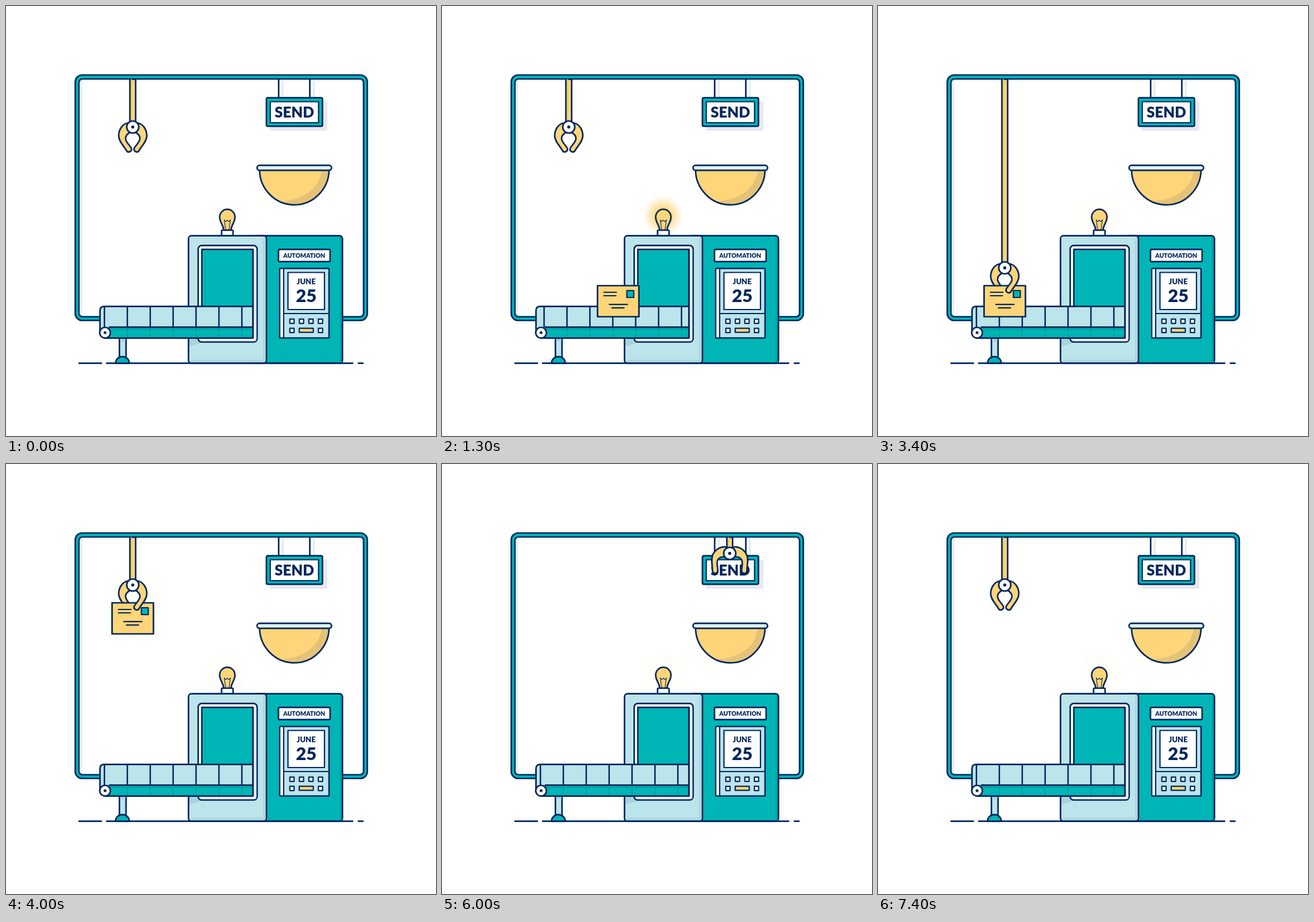
Animation, 748 px wide and 748 px high, one loop 8 s. Source, as an HTML page:

```html
<!DOCTYPE html>
<html lang="en">
<head>
<meta charset="utf-8">
<title>Mail automation</title>
<style>
  html, body { margin: 0; width: 100%; height: 100%; overflow: hidden; background: #fff; }
  svg { display: block; width: 100%; height: 100%; }
  .ln { stroke: #00265e; stroke-width: 2.7; stroke-linejoin: round; stroke-linecap: round; }
  .thin { stroke-width: 2.2; }
  .teal { fill: #00b5b5; }
  .sky { fill: #bce4eb; }
  .sun { fill: #fed578; }
  .white { fill: #fff; }
  .none { fill: none; }
  .gray { fill: #e6e9f0; }
  .skyShade { fill: #a6d2db; }
  .tealShade { fill: #00a3a7; }
  .sunShade { fill: #e4c278; }
  .navy { fill: #00265e; }
  text { font-family: Lato, "Open Sans", sans-serif; font-weight: 900; fill: #00265e; text-anchor: middle; }
</style>
</head>
<body>
<svg viewBox="0 0 748 748" xmlns="http://www.w3.org/2000/svg">
  <defs>
    <radialGradient id="halo">
      <stop offset="0" stop-color="#fdca58" stop-opacity=".95"/>
      <stop offset=".4" stop-color="#fdd066" stop-opacity=".75"/>
      <stop offset=".75" stop-color="#fed985" stop-opacity=".28"/>
      <stop offset="1" stop-color="#fee6ad" stop-opacity="0"/>
    </radialGradient>
    <clipPath id="beltClip"><path d="M164 530q0-7 7-7H429V577H164Z"/></clipPath>
    <clipPath id="mailClip"><path d="M0 0H748V281H429V748H0Z"/></clipPath>
    <path id="arm" d="M-8-7C-18-6-24.5 5-24.5 15C-24.5 25-16 32-11 41C-8.500 45.500-.8 43-2.500 37C-5 32-12.500 26-12.500 20C-12.500 14-8 11-4 9Z"/>
  </defs>

  <!-- wall frame -->
  <rect class="ln teal" x="120.500" y="120" width="508" height="427" rx="12"/>
  <rect class="ln white" x="127" y="127" width="495" height="413.500" rx="6"/>
  <path class="gray" d="M128.400 535V133q0-4.600 4.600-4.600H616q3 0 4 2H136q-4 0-4 4V538q-3.600 0-3.600-3Z"/>

  <!-- hanging sign -->
  <path class="gray" d="M480 128.500h3V166h-3ZM534 128.500h3V166h-3Z"/>
  <rect class="gray" x="459" y="166" width="100" height="51" rx="3"/>
  <path class="ln none" d="M474.300 128V159M528.500 128V159"/>
  <rect class="ln teal" x="453" y="159.700" width="97.500" height="49.500" rx="2.500"/>
  <rect class="ln thin white" x="459.700" y="166.500" width="84" height="36.500"/>
  <text x="501.500" y="194" font-size="25.800">SEND</text>

  <!-- lamp -->
  <circle id="glow" cx="384.500" cy="365" r="37" fill="url(#halo)"/>
  <circle id="rest" cx="384.500" cy="365" r="36.500" fill="#fed578"/>
  <path class="ln sun" d="M378.500 390C378.500 381 371.700 377 371.700 367A13.300 13.300 0 0 1 398.300 367C398.300 377 391.500 381 391.500 390Z"/>
  <path class="none" stroke="#00265e" stroke-width="1.100" d="M382 389L379.800 372.500L382.500 375L385 372.500L387.500 375L390.200 372.500L388 389"/>
  <rect class="ln white" x="375" y="390" width="20" height="10" rx="1.500"/>

  <!-- ground and machine -->
  <path class="ln none" d="M127 621.300H166M175 621.300H603M613 621.300H621"/>
  <rect class="ln teal" x="430" y="399.700" width="155.300" height="221.500" rx="5"/>
  <path class="tealShade" d="M580 402H582q2 0 2 3V619.800H580Z"/>
  <rect class="ln sky" x="317.500" y="399.700" width="135.500" height="221.500" rx="5"/>
  <path class="skyShade" opacity=".6" d="M447 404H451.600V616q0 3.800-4 3.800H322V615H447Z"/>
  <path class="skyShade" d="M319 578H340V586L319 592Z"/>
  <rect class="ln white" x="334.300" y="416.700" width="102.500" height="167.800" rx="6"/>
  <path class="gray" d="M431 424H435.400V580q0 3-3 3H340q-3 0-4-3H431Z"/>
  <rect class="ln teal" x="340.700" y="423.300" width="89" height="154"/>

  <!-- control panel -->
  <rect class="ln white" x="474" y="423.300" width="89.800" height="21.400" rx="2"/>
  <text x="518.700" y="438" font-size="10.500">AUTOMATION</text>
  <rect class="ln sky" x="476.200" y="456.500" width="85.800" height="121" rx="2"/>
  <rect class="white" x="477.500" y="457.800" width="5" height="118.400"/>
  <path class="ln thin none" d="M483 457V577M483 535H561.500"/>
  <rect class="ln thin white" x="490.500" y="463.500" width="63.500" height="64.500"/>
  <text x="522.200" y="483.500" font-size="13">JUNE</text>
  <text x="522.200" y="514.500" font-size="31">25</text>
  <g id="keys" class="ln thin white"></g>
  <rect class="ln thin sun" x="510" y="560.700" width="24.500" height="7"/>

  <!-- conveyor -->
  <rect class="ln sky" x="197.300" y="577" width="11.500" height="36"/>
  <rect class="skyShade" x="198.600" y="579" width="9" height="4"/>
  <path class="ln teal" d="M190.500 621.300A12 11.500 0 0 1 214.500 621.300Z"/>
  <rect class="teal" x="172" y="558" width="257" height="19.500"/>
  <rect class="tealShade" x="172" y="559" width="257" height="4.500"/>
  <path class="sky" d="M163.500 568V530q0-7.300 7.300-7.300H429V558.700H172Z"/>
  <g clip-path="url(#beltClip)">
    <path id="seams" class="none" stroke="#00265e" stroke-width="2.500"/>
    <path id="lowSeams" class="none" stroke="#00999f" stroke-width="1.500"/>
  </g>
  <path class="ln none" d="M163.500 568V530q0-7.300 7.300-7.300H429.500M180 558.700H429.500M172 577.600H429.500V424"/>
  <circle class="ln white" cx="172.300" cy="568.300" r="9.300"/>
  <circle class="navy" cx="172.300" cy="568.300" r="2.500"/>

  <!-- claw and letter -->
  <g id="clawBack">
    <rect id="rope" class="ln sun" x="-5"  width="10"/>
    <rect id="ropeShade" class="sunShade" x="-3.600" width="2.400"/>
    <use id="armL" href="#arm" class="ln sun"/>
  </g>
  <g clip-path="url(#mailClip)">
    <g id="mail">
      <rect class="ln sun" width="72" height="54"/>
      <path class="ln thin none" d="M11 11.500H33M11 17.500H32M20.500 32.700H52M25 38.700H46"/>
      <rect class="ln thin teal" x="51" y="8.500" width="12" height="12"/>
    </g>
  </g>
  <g id="clawFront">
    <use id="armR" href="#arm" class="ln sun"/>
    <circle class="ln white" r="10.500"/>
    <circle class="navy" r="2.700"/>
  </g>

  <!-- bowl -->
  <path class="sun" d="M441 284A60.500 61.800 0 0 0 562 284Z"/>
  <path class="sunShade" d="M549 285C546 316 520 337 479 340A60.500 61.800 0 0 0 561.500 285Z"/>
  <path class="ln none" d="M441 284A60.500 61.800 0 0 0 562 284"/>
  <rect class="ln" fill="#dff2f6" x="436.700" y="277.200" width="129.600" height="8.600" rx="4.300"/>
</svg>
<script>
  const $ = id => document.getElementById(id);
  const set = (id, name, value) => $(id).setAttribute(name, value);
  const LOOP = 8000, STEP = 100;
  const HOME = { x: 220.5, y: 210.5 }, DROP = { x: 500.5, y: 155.5 }, LOW = 455.5;
  const GAP = 39.85, TRAVEL = GAP * 7;
  const FALL_AT = 5600;

  const prog = (t, a, b) => Math.min(1, Math.max(0, (t - a) / (b - a)));
  const cubic = p => p < .5 ? 4 * p ** 3 : 1 - 4 * (1 - p) ** 3;
  const ease = (t, a, b) => cubic(prog(t, a, b));
  const mix = (a, b, k) => a + (b - a) * k;

  for (const y of [544.7, 560.7])
    for (const x of [493.7, 510.3, 526.8, 543.4]) {
      if (y > 550 && x > 500 && x < 540) continue;
      const key = document.createElementNS('http://www.w3.org/2000/svg', 'rect');
      Object.entries({ x, y, width: 7.4, height: 7.4 }).forEach(([n, v]) => key.setAttribute(n, v));
      $('keys').append(key);
    }

  function drawBelt(left) {
    let top = '', low = '';
    for (let x = 171.2 + left % GAP - GAP; x < 440; x += GAP) {
      top += `M${x} 523V558.7`;
      low += `M${x} 560V577`;
    }
    set('seams', 'd', top);
    set('lowSeams', 'd', low);
  }

  function drawClaw(x, y, open) {
    set('clawBack', 'transform', `translate(${x} ${y})`);
    set('clawFront', 'transform', `translate(${x} ${y})`);
    for (const id of ['rope', 'ropeShade']) {
      set(id, 'y', 127.5 - y);
      set(id, 'height', y - 127.5);
    }
    set('armL', 'transform', `rotate(${30 * open})`);
    set('armR', 'transform', `scale(-1 1) rotate(${30 * open})`);
  }

  function draw(t) {
    const left = TRAVEL * (1 - prog(t, 0, 1880));
    drawBelt(left);

    const glow = prog(t, 0, 600) * (1 - prog(t, 1400, 2100));
    set('glow', 'opacity', glow);
    set('rest', 'opacity', .04 * prog(t, 1400, 2100));

    // down and up over the belt, then out to the bowl and back
    const dip = ease(t, 1800, 2871) - ease(t, 3385, 4000);
    const out = ease(t, 4200, 5500) - ease(t, 6100, 7400);
    const x = mix(HOME.x, DROP.x, out);
    const y = mix(HOME.y, DROP.y, out) + (LOW - HOME.y) * dip;
    const open = ease(t, 1800, 2500) - ease(t, 2800, 3385)
               + ease(t, FALL_AT, 5950) - ease(t, 6100, 6850);
    drawClaw(x, y, open);

    let mx = HOME.x - 36 + left, my = 486.5;
    if (t >= FALL_AT) {
      mx = DROP.x - 36;
      my = DROP.y + 31 + 105 * prog(t, FALL_AT, 6000) ** 2;
    } else if (t > 3385) {
      mx = x - 36;
      my = y + 31;
    }
    set('mail', 'transform', `translate(${mx} ${my})`);
  }

  const start = performance.now();
  function tick() {
    const t = (performance.now() - start) % LOOP;
    draw(Math.floor(t / STEP) * STEP);
    requestAnimationFrame(tick);
  }
  tick();
</script>
</body>
</html>
```
